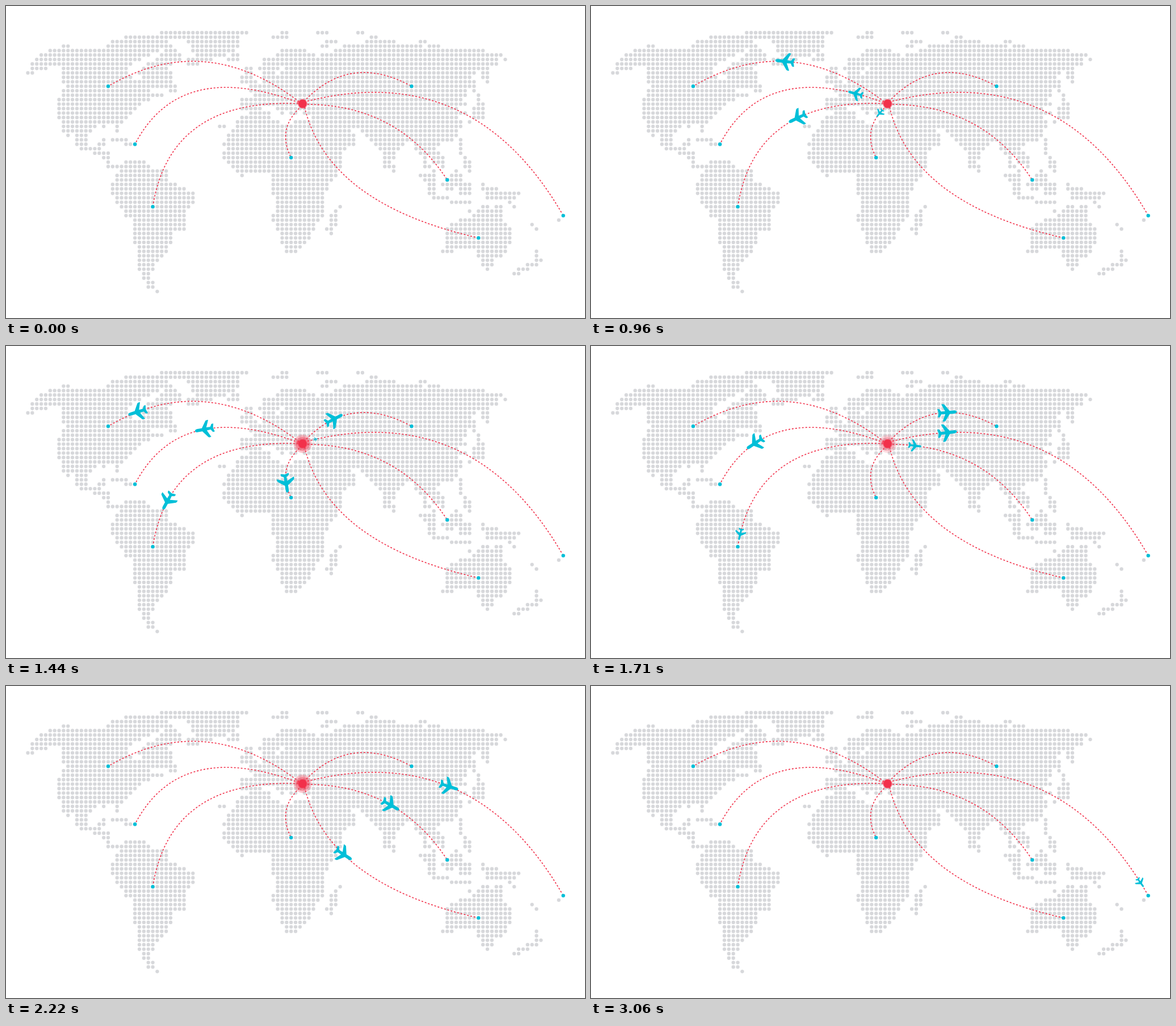
An HTML page with a canvas for the animation above (3090 ms loop, 1020x549 px).

```html
<!DOCTYPE html>
<html lang="en">
<head>
<meta charset="utf-8">
<title>Flight routes</title>
<style>
html, body { margin: 0; width: 100%; height: 100%; overflow: hidden; background: #fff; }
canvas { display: block; }
</style>
</head>
<body>
<canvas id="stage" width="1020" height="549"></canvas>
<script>
const LOOP = 3090, STEP = 30;
const RED = '#f2304a', TEAL = '#00bfd8', GREY = '#d7d8db';
const HUB = [522.5, 172];
const stage = document.getElementById('stage');
const ctx = stage.getContext('2d');

const gridX = col => 38.5 + col * 7.86;
const gridY = row => 47 + row * 7.85;

// Coastlines in grid units: a grid point on or inside an outline becomes a dot.
const land = {
  northAmerica: 'M5 4L8 3H9L10 4H18V3L19 2 22 1H32L31 2 32 3 28 4 27 5 25 6 23 7 22 8V9L23 10 24 11 25 12V11L26 10 25 9 26 8 27 7 29 6 30 5 31 4H33L34 5V6L32 7 31 8 32 9V11L33 12V13H32V12H28L27 13 30 14 26 15 25 16 24 17 23 18 22 19 21 20H20V22V20H17V21V20H16L14 22 13 23V25L16 26 18 27V30L17 28 15 27 12 26 11 25V22H9V23V22H8V20L7 19V15L8 14V13L9 12 8 11V7H1L2 6 3 5zM1 7V8H4M1 8L0 9H1',
  caribbean: 'M17 24L16 25H17M19 24H22V25H24',
  greenland: 'M30 0H49L47 1V3L46 4 44 5 41 6 38 7H36V6L38 5 37 4V3L36 2 34 1zM46 5H47M45 6H47',
  southAmerica: 'M18 30H21L22 29H26L27 30 28 31H31V33L33 34 35 35 37 36V38L36 39 35 40V44L32 45V47L31 48V49L30 50 29 51 28 52V53L27 54V55L28 56V57L29 58 27 57V56L26 55V54L25 53V48L24 47V42L22 41V40L20 38 19 36V34L20 33V32L22 30z',
  africa: 'M50 18H54V19L56 20 59 21 60 20H66L67 22 68 25 70 28V30L69 32 67 34V35L66 36V41L64 43V44L63 46 60 49H58L57 47V45L55 42V41L56 40V37L55 36V32L54 31H48V32V31H47L45 29 44 28V27L45 26 44 25 45 24V23L48 19zM43 21H44',
  madagascar: 'M70 39L69 40 68 41V45M69 40V43M67 44H68',
  europe: 'M57 4H62L64 5 65 6 66 5V20L64 19 62 18V17H61L60 18H59L58 17 57 18 55 16H53L52 17H48V15H51V14L50 13V12L54 11 53 10H57V9L58 8 57 7 56 8 55 9H53L52 8 53 7V6H55L56 5z',
  britain: 'M50 8H49V10H48V11H51M50 9V10',
  asia: 'M66 5L70 4 71 3H75L76 2 77 1H78L81 2 85 3 97 4H102V5H106L105 6V7L102 8 100 9 99 10V11L98 12V14L97 15 98 16 96 17 97 18 96 19 97 20V21L96 23 95 24 92 25 91 26 92 27 93 28V30L91 29 90 27 89 28 90 30 91 31 89 30V28L87 26 86 24 84 24V25L82 27V28L81 29 82 30V31L80 30V27L77 24 76 23 75 22 73 21H71L72 22 73 23V25L71 26 70 27H68V24L67 22 66 20z',
  arctic: 'M57 0H58M55 1H58M65 0H67M74 0H75M67 2H69M66 3H67M88 2H89M90 3H92M107 6h.1',
  pacificRim: 'M103 8V11M102 9V10M99 12H100M100 11V13M101 14V19M102 16V19M100 17V19L99 20M98 18h.1',
  philippines: 'M97 24V25M97 26V27L98 28V30M99 29V31',
  indonesia: 'M88 32H91V33H89L91 37M90 34H91V36H90M92 37H94M95 38H99M96 31V32L94 33 93 34 94 35H95L96 34 97 33V32H95M97 34H99V36H97',
  newGuinea: 'M102 34V35H105L107 36 108 37V38L109 39M103 36V37H109L110 36H109M104 36H107',
  australia: 'M102 39H103L104 40 105 39H106V41L107 43 108 44V47L107 48V49L106 50 104 51V52H102V51L100 48H96L95 49H93L94 48V44L97 42 100 41zM99 40h.1M103 53h.1',
  newZealand: 'M114 49V51H115M114 52H112V53H110M109 54H110M113 43L114 44M119 42h.1'
};

// Each route: start point, control point, destination grid cell,
// take-off and landing times, and the plane's tilt off the tangent in degrees.
const routes = [
  { start: [521, 172], bend: [352, 40], cell: [18, 12], from: 118, to: 1687, tilt: 4 },
  { start: [521, 172], bend: [307, 89.5], cell: [24, 25], from: 725, to: 2103, tilt: 0 },
  { start: [521, 172], bend: [289, 160], cell: [28, 39], from: 268, to: 1808, tilt: 0 },
  { start: [521, 176], bend: [476, 215], cell: [59, 28], from: 812, to: 1673, tilt: 0 },
  { start: [525, 168], bend: [606, 82], cell: [86, 12], from: 1094, to: 2190, tilt: -3 },
  { start: [525, 173], bend: [690, 172], cell: [94, 33], from: 1505, to: 2852, tilt: 0 },
  { start: [525, 169], bend: [822, 91], cell: [120, 41], from: 1370, to: 3148, tilt: -4 },
  { start: [526, 178], bend: [567, 348], cell: [101, 46], from: 1777, to: 3072, tilt: -11 }
];

const planeShape = new Path2D(
  'M17.2 0C17.2 -2 15 -2.8 12.5 -2.8L4.6 -2.8 -4 -14.6Q-5.6 -16 -9 -15.2L-3.4 -2.7 -10.4 -2.4 -13 -6.8Q-14.8 -8 -16.8 -7L-15 0' +
  'L-16.8 7Q-14.8 8 -13 6.8L-10.4 2.4 -3.4 2.7 -9 15.2Q-5.6 16 -4 14.6L4.6 2.8 12.5 2.8C15 2.8 17.2 2 17.2 0z');

const clamp = v => Math.max(0, Math.min(1, v));
const smooth = v => { v = clamp(v); return v * v * (3 - 2 * v); };

function disc(c, x, y, r, color) {
  c.fillStyle = color;
  c.beginPath();
  c.arc(x, y, r, 0, 2 * Math.PI);
  c.fill();
}

function pointAt([x0, y0, x1, y1, x2, y2], u) {
  const v = 1 - u;
  return {
    x: v * v * x0 + 2 * u * v * x1 + u * u * x2,
    y: v * v * y0 + 2 * u * v * y1 + u * u * y2,
    angle: Math.atan2(v * (y1 - y0) + u * (y2 - y1), v * (x1 - x0) + u * (x2 - x1))
  };
}

// Cumulative lengths, so planes keep a constant speed along the curve.
const SAMPLES = 200;
function measure(curve) {
  const sums = [0];
  let last = pointAt(curve, 0);
  for (let i = 1; i <= SAMPLES; i++) {
    const p = pointAt(curve, i / SAMPLES);
    sums.push(sums[i - 1] + Math.hypot(p.x - last.x, p.y - last.y));
    last = p;
  }
  return sums;
}

function paramAt(sums, share) {
  const goal = share * sums[SAMPLES];
  let i = 1;
  while (i < SAMPLES && sums[i] < goal) i++;
  return (i - 1 + (goal - sums[i - 1]) / (sums[i] - sums[i - 1])) / SAMPLES;
}

function drawMap(c) {
  c.fillStyle = '#fff';
  c.fillRect(0, 0, 1020, 549);
  c.lineWidth = 0.6;
  c.lineCap = c.lineJoin = 'round';
  const shapes = Object.values(land).map(d => new Path2D(d));
  for (let row = 0; row < 59; row++) {
    for (let col = 0; col < 121; col++) {
      if (shapes.some(s => c.isPointInPath(s, col, row) || c.isPointInStroke(s, col, row))) {
        disc(c, gridX(col), gridY(row), 3.15, GREY);
      }
    }
  }
  c.lineCap = 'butt';
  c.lineWidth = 1.6;
  c.strokeStyle = RED;
  c.setLineDash([3, 3]);
  for (const { curve: [x0, y0, x1, y1, x2, y2] } of routes) {
    c.beginPath();
    c.moveTo(x0, y0);
    c.quadraticCurveTo(x1, y1, x2, y2);
    c.stroke();
  }
  for (const { curve } of routes) disc(c, curve[4], curve[5], 3.2, TEAL);
}

function drawPlane(route, t) {
  if (t <= route.from || t >= route.to) return;
  const share = (t - route.from) / (route.to - route.from);
  const p = pointAt(route.curve, paramAt(route.sums, share));
  const size = Math.min(clamp((t - route.from) / 300), clamp((route.to - t) / 160));
  ctx.save();
  ctx.translate(p.x, p.y);
  ctx.rotate(p.angle + route.tilt * Math.PI / 180);
  ctx.scale(size, size);
  ctx.fillStyle = TEAL;
  ctx.fill(planeShape);
  ctx.restore();
}

function drawHub(t) {
  const phase = (t % 1030) / 1030;
  const glow = smooth(phase / 0.18) * (1 - smooth((phase - 0.46) / 0.44));
  const halo = (r, a) => disc(ctx, ...HUB, r, `rgba(242,48,74,${a})`);
  halo(16, 0.28 * glow);
  halo(12.5, 0.4 * glow);
  halo(9, 0.35);
  halo(7.4, 1);
}

for (const r of routes) {
  r.curve = [...r.start, ...r.bend, gridX(r.cell[0]), gridY(r.cell[1])];
  r.sums = measure(r.curve);
}
const map = document.createElement('canvas');
map.width = 1020;
map.height = 549;
drawMap(map.getContext('2d'));

const begin = performance.now();
function draw() {
  const elapsed = (performance.now() - begin) % LOOP;
  const t = elapsed < 60 ? 0 : Math.floor(elapsed / STEP) * STEP;
  ctx.drawImage(map, 0, 0);
  for (const r of routes) drawPlane(r, t);
  drawHub(t);
  requestAnimationFrame(draw);
}
draw();
</script>
</body>
</html>
```
